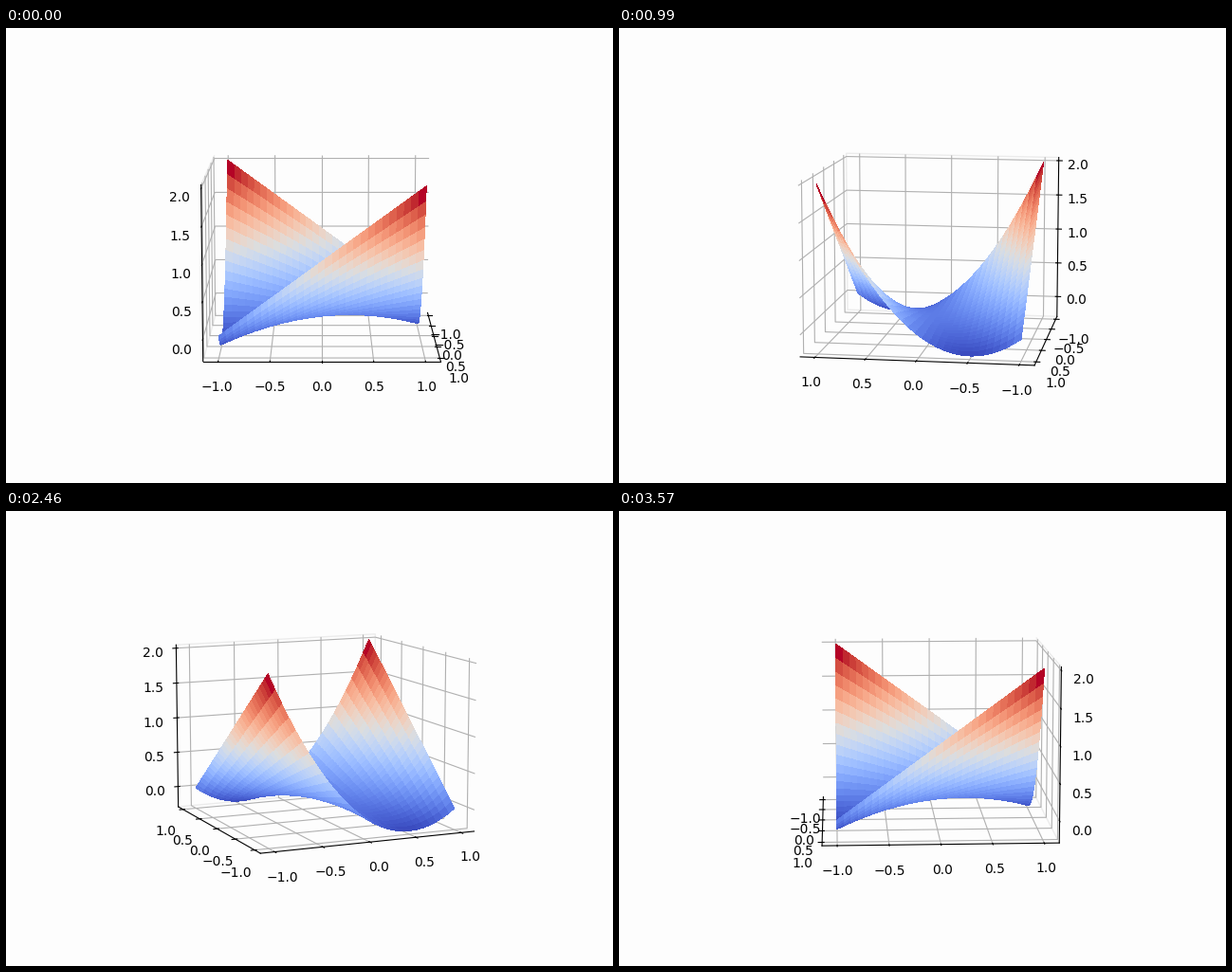
Write a matplotlib script that moves like this. It is 640 px wide and 480 px high and loops after 3600 ms.

```python
import numpy as np
import matplotlib.pyplot as plt
from matplotlib.animation import FuncAnimation

FRAMES = 120
INTERVAL = 30
ELEVATION = 10
BACKGROUND = "#fdfdfd"


def padded(low, high, margin=1 / 48):
    """Widen a range by a share of its length on both sides."""
    pad = (high - low) * margin
    return low - pad, high + pad


def saddle(x, y):
    return x**2 + x * y


fig = plt.figure(figsize=(6.4, 4.8), dpi=100, facecolor=BACKGROUND)
ax = fig.add_subplot(projection="3d", facecolor="none")

side = np.linspace(-1, 1, 30)
x, y = np.meshgrid(side, side)
ax.plot_surface(x, y, saddle(x, y), cmap="coolwarm",
                rstride=1, cstride=1, linewidth=0, antialiased=False)

ax.set_xlim(*padded(-1.1, 1.1))
ax.set_ylim(*padded(-1.1, 1.1))
ax.set_zlim(*padded(-0.25, 2))

# Only the panes across the y axis keep a faint outline.
for axis, edge in ((ax.xaxis, "none"), (ax.yaxis, "#ececec"), (ax.zaxis, "none")):
    axis.pane.set(alpha=None, facecolor="none", edgecolor=edge)


def turn(frame):
    ax.view_init(elev=ELEVATION, azim=frame * 360 / FRAMES)
    return ()


anim = FuncAnimation(fig, turn, frames=FRAMES, interval=INTERVAL,
                     init_func=lambda: turn(0), repeat=True, repeat_delay=0)
plt.show()
```
